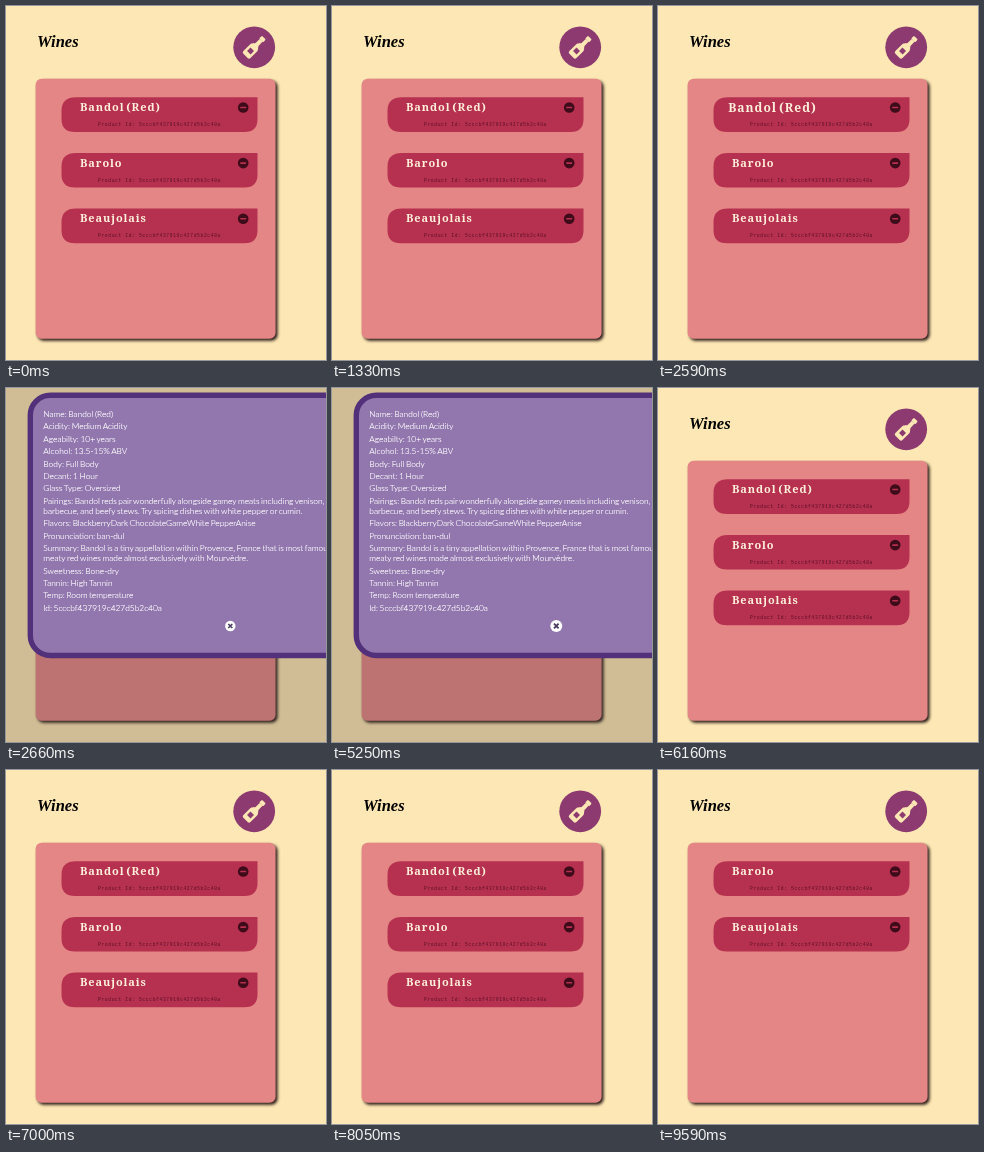
An HTML page for the animation above (9.66 s loop, 320 by 354 pixels).

```html
<!DOCTYPE html>
<html lang="en">
<head>
<meta charset="utf-8">
<title>Wines</title>
<style>
  html, body { margin: 0; width: 100%; height: 100%; overflow: hidden; background: #fde7b4; }
  svg { display: block; width: 100%; height: 100%; }
  .heading { font: italic 700 16.5px "Liberation Serif", serif; }
  .wine { font: 600 11px "Noto Serif", serif; letter-spacing: .9px; word-spacing: -2px; fill: #fff0dc; }
  .caption { font: 4.6px "Liberation Mono", monospace; letter-spacing: .66px; fill: #5a1026; }
  .details {
    font: 300 8.4px Lato, sans-serif; word-spacing: -.65px;
    fill: #fff; stroke: #fff; stroke-width: .15px;
  }
  .card { filter: drop-shadow(2px 2px 1.5px #2a1a18); }
</style>
</head>
<body>
<svg viewBox="0 0 320 354">
  <text class="heading" x="31" y="41">Wines</text>

  <circle cx="248.2" cy="41.3" r="20.9" fill="#8d3a70"/>
  <g transform="translate(248 41.5) rotate(45)" fill="#fde7b4">
    <path d="M-2-10V-5C-2-3-5-2-5 1V10Q-5 12-3 12H3Q5 12 5 10V1C5-2 2-3 2-5V-10Z"/>
    <rect x="-2.7" y="-14" width="5.4" height="4" rx="1"/>
    <rect x="-2.5" y="2.5" width="5" height="4.8" fill="#8d3a70"/>
  </g>

  <rect class="card" x="29.6" y="72.7" width="240" height="260" rx="6" fill="#e48685"/>
  <g id="list"></g>

  <g id="modal">
    <rect width="320" height="354" fill="#3b3631" opacity=".237"/>
    <rect x="24.3" y="7.3" width="420" height="260.2" rx="20"
          fill="#9276ae" stroke="#52307a" stroke-width="5.4"/>
    <g id="details" class="details"></g>
    <g id="close">
      <circle r="5.2" fill="#fff"/>
      <path d="M-2-2 2 2M2-2-2 2" stroke="#4a3a60" stroke-width="1.6"/>
    </g>
  </g>
</svg>
<script>
const LOOP = 9660;
const HOVER = 2380, OPEN = 2660, CLOSE_HOVER = 4410, CLOSE = 5320, REMOVE = 9100;
const PITCH = 55.6;
const PRODUCT_ID = "5cccbf437919c427d5b2c40a";
const $ = id => document.getElementById(id);

const wines = ["Bandol (Red)", "Barolo", "Beaujolais"];
$("list").innerHTML = wines.map(name => `
  <g>
    <path d="M70 91.3H251.5V113Q251.5 126 238.5 126H69Q55.5 126 55.5 113V105Q55.5 91.3 70 91.3Z" fill="#b6304f"/>
    <text class="wine" x="74" y="105.3">${name}</text>
    <text class="caption" x="92" y="120">Product Id: ${PRODUCT_ID}</text>
    <circle cx="237.2" cy="101.5" r="5.3" fill="#3d0b19"/>
    <rect x="234.2" y="100.7" width="6" height="1.6" rx=".4" fill="#b6304f"/>
  </g>`).join("");
const items = [...$("list").children];
const hoveredTitle = items[0].querySelector(".wine");

// Each entry is one paragraph, given as its wrapped lines.
const paragraphs = [
  ["Name: Bandol (Red)"],
  ["Acidity: Medium Acidity"],
  ["Ageabilty: 10+ years"],
  ["Alcohol: 13.5-15% ABV"],
  ["Body: Full Body"],
  ["Decant: 1 Hour"],
  ["Glass Type: Oversized"],
  ["Pairings: Bandol reds pair wonderfully alongside gamey meats including venison, lamb,",
   "barbecue, and beefy stews. Try spicing dishes with white pepper or cumin."],
  ["Flavors: BlackberryDark ChocolateGameWhite PepperAnise"],
  ["Pronunciation: ban-dul"],
  ["Summary: Bandol is a tiny appellation within Provence, France that is most famous for",
   "meaty red wines made almost exclusively with Mourvèdre."],
  ["Sweetness: Bone-dry"],
  ["Tannin: High Tannin"],
  ["Temp: Room temperature"],
  ["Id: " + PRODUCT_ID]
];
let baseline = 29;
for (const lines of paragraphs) {
  lines.forEach((line, i) => {
    if (i) baseline += 10.1;
    $("details").innerHTML += `<text x="37.3" y="${baseline}">${line}</text>`;
  });
  baseline += 12.4;
}

const progress = (t, start, duration) => {
  const p = Math.min(1, Math.max(0, (t - start) / duration));
  return p * p * (3 - 2 * p);
};

function scaleAround(node, x, y, scale) {
  node.setAttribute("transform", `translate(${x} ${y}) scale(${scale}) translate(${-x} ${-y})`);
}

function draw(now) {
  const t = now % LOOP;
  const removed = t >= REMOVE;
  items.forEach((item, i) => {
    item.setAttribute("transform", `translate(0 ${(i - removed) * PITCH})`);
  });
  items[0].style.display = removed ? "none" : "";

  scaleAround(hoveredTitle, 112.5, 101.5, t < OPEN ? 1 + 0.1 * progress(t, HOVER, 200) : 1);

  $("modal").style.display = t >= OPEN && t < CLOSE ? "" : "none";
  const closeScale = 1 + 0.15 * progress(t, CLOSE_HOVER - 70, 140);
  $("close").setAttribute("transform", `translate(224.3 238) scale(${closeScale})`);
  requestAnimationFrame(() => draw(performance.now()));
}
draw(performance.now());
</script>
</body>
</html>
```
